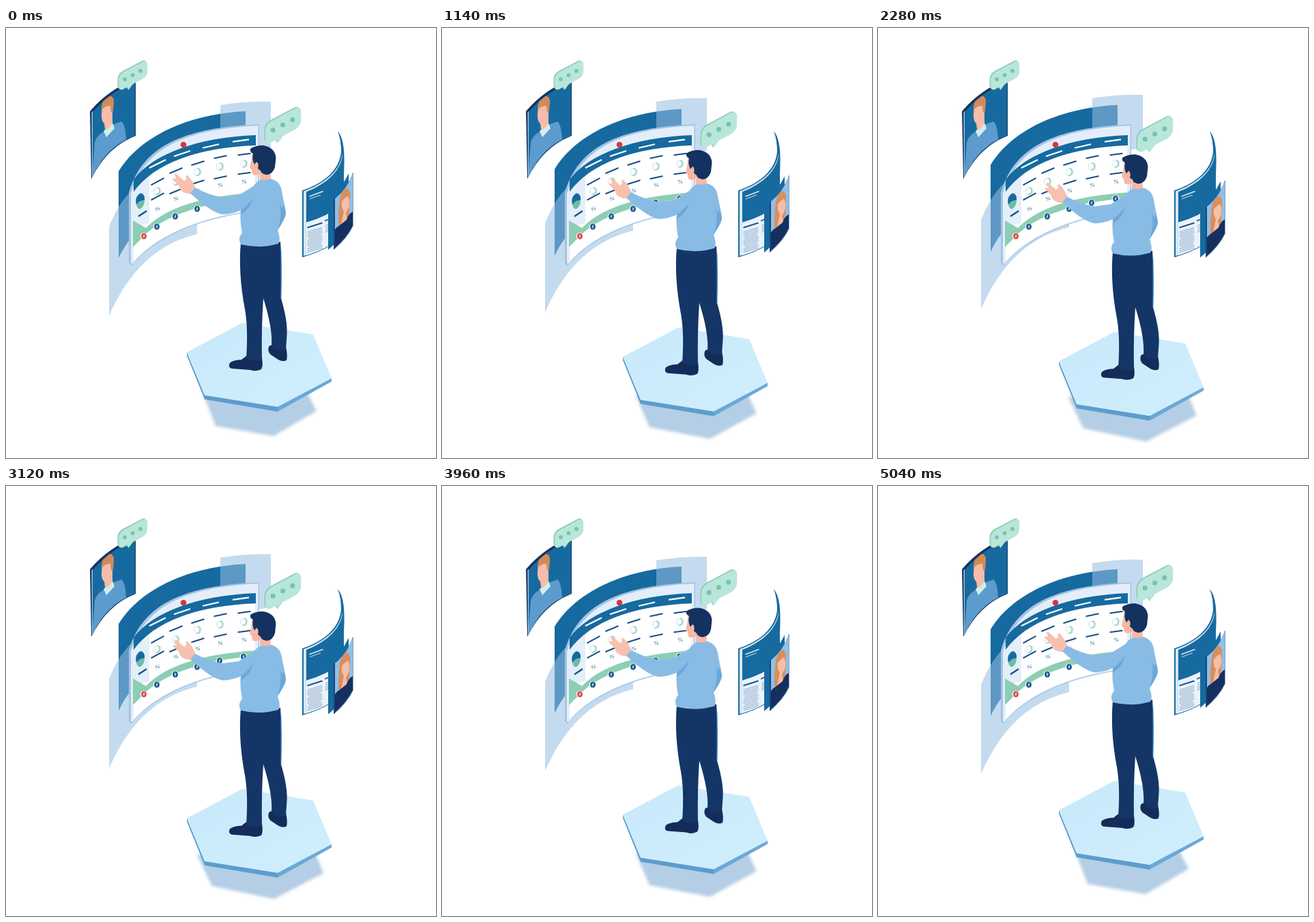
These frames come from a looping animation (630x630 px, 5.1 s). An HTML page:

```html
<!DOCTYPE html>
<html lang="en">
<head>
<meta charset="utf-8">
<title>Virtual workspace</title>
<style>
html, body { margin: 0; width: 100%; height: 100%; overflow: hidden; background: #fff; }
svg { display: block; width: 630px; height: 630px; }
text { font: bold 8px Inter, Arial, sans-serif; fill: #5d93bf; text-anchor: middle; }
</style>
</head>
<body>
<svg viewBox="0 0 630 630">
  <defs>
    <filter id="soft" x="-20%" y="-20%" width="140%" height="140%"><feGaussianBlur stdDeviation="2.3"/></filter>
    <linearGradient id="floor" x1="0" y1="0" x2="1" y2="1">
      <stop offset="0" stop-color="#c8e9fb"/><stop offset="1" stop-color="#d0effd"/>
    </linearGradient>
    <clipPath id="cardClip"><path d="M127 123Q152 94 189 78V158Q148 172 127 217Z"/></clipPath>
    <clipPath id="faceClip"><path d="M482 250Q500 236 508 213V289Q500 306 482 322Z"/></clipPath>
  </defs>

  <!-- portrait card, left -->
  <path d="M123 122Q150 90 190 75V158Q148 174 125 221Z" fill="#17335f"/>
  <path d="M125.500 123L127 122V217L126 219Z" fill="#a5c7e5"/>
  <g clip-path="url(#cardClip)">
    <path d="M120 60H195V225H120Z" fill="#176a9f"/>
    <path d="M126 220L130 168Q132 158 143 152L158 141L169 137Q175 141 176 165L160 200Z" fill="#5b9bcd"/>
    <path d="M143 151L156 139L159 147L147 160Z" fill="#d3eee9"/>
    <path d="M141 115Q147 107 156 110L156 139Q151 150 145 148L144 140Q139 136 140 125Z" fill="#f5bca9"/>
    <path d="M140 116Q142 101 152 99Q159 101 158 110L157 122L154 124L153 114Q146 113 140 120Z" fill="#d18a59"/>
  </g>
  <g id="bubbleA"></g>

  <!-- glass layers -->
  <path id="glassBack" d="M165 210C195 160 265 126 351 122V240L183 308Q173 320 165 337Z" fill="#166a9f"/>
  <g id="glassFront" fill="#97bfe2" fill-opacity=".56">
    <path d="M314 113Q350 107 388 108V185L314 200Z"/>
    <path d="M151 291Q164 258 183 239L280 200V302C218 317 178 360 151 422Z"/>
  </g>

  <!-- main panel -->
  <path d="M180 241C200 172 262 146 371 141V268C270 280 215 312 184 348L180 345Z" fill="#a4c4e4"/>
  <path d="M183 243C203 175 263 148.500 369.500 143V267C270 279 215 310 185 346L183 344Z" fill="#e3eefa"/>
  <path d="M187 241C216 198 278 174 365 171V266C278 277 217 307 187 342Z" fill="#fff"/>
  <path d="M187 241Q197 225 210 216V286L187 292Z" fill="#e3eff9"/>
  <path d="M187 222C216 184 282 160 366 157V172C280 175 216 199 187 240Z" fill="#166a9f"/>
  <path d="M186 282L205 293C229 268 275 247 366 241V249C292 255 238 273 207 300L186 321Z" fill="#8dceb4"/>
  <circle cx="260" cy="171" r="4.300" fill="#d7363c"/>
  <path d="M197 242Q204 243 203 252L196 254L191 259Q188 247 197 242Z" fill="#166a9f"/>
  <path d="M191 259L196 254L203 252Q203 261 197 265Q193 266 191 259Z" fill="#6cbca6"/>
  <path d="M194 276L206 268" stroke="#164f85" stroke-width="2.200"/>
  <g id="grid"></g>

  <!-- document, right -->
  <path d="M434 238C465 228 489 208 491 181Q491 164 486 151C497 164 496 190 495 215V300C480 320 460 328 434 336Z" fill="#176a9f"/>
  <path d="M436 239C465 229 490 210 493 184V300C480 318 460 327 436 334Z" fill="#d5e6f4"/>
  <path d="M440 240C466 230 489 212 493 188V258Q472 276 440 285Z" fill="#176a9f"/>
  <path d="M440 285Q472 276 493 258V300C480 318 460 327 440 333Z" fill="#eaf3fb"/>
  <g id="lines" fill="none"></g>

  <!-- portrait cards, right -->
  <g id="cards">
    <path d="M472 250Q490 238 502 213V292Q491 309 472 325Z" fill="#176a9f"/>
    <path d="M480 251Q500 237 508.500 211V290Q500 308 480 325Z" fill="#17477c"/>
    <g clip-path="url(#faceClip)">
      <path d="M480 205H510V326H480Z" fill="#8fc0e6"/>
      <path d="M488 260Q489 240 498 235Q505 235 504 248L502 288L488 296Q486 280 488 260Z" fill="#d98e5c"/>
      <path d="M492 254Q496 249 501 246Q505 254 502 264L498 271L500 281L491 289L495 268Q491 265 492 254Z" fill="#f6bda9"/>
      <path d="M478 328V302Q483 292 489 289L499 281Q502 271 510 268V292Z" fill="#15305f"/>
    </g>
  </g>

  <polygon id="shadow" fill="#b4cee5" filter="url(#soft)"/>

  <!-- platform, bubble and man -->
  <g id="rider">
    <path d="M265 475L291 538L398 555V562L291 544L265 480Z" fill="#5b9dce"/>
    <path d="M398 555L477 513V518L398 562Z" fill="#6aa8d8"/>
    <path d="M346 432L450 449L477 513L398 555L291 538L265 475Z" fill="url(#floor)"/>
    <g id="bubbleB"></g>

    <g fill="#152c5b">
      <path d="M385 467Q388 462 396 468L410 467Q413 480 411 487Q404 490 396 484L387 478Q383 473 385 467Z"/>
      <path d="M327 493Q328 487 345 486L354 479Q365 484 375 483Q377 496 374 500Q366 504 358 501L331 499Q326 498 327 493Z"/>
    </g>
    <path d="M344 314Q372 322 402 313Q405 350 403 396Q413 430 411.500 450L410 471Q398 475 389 466Q391 440 377 396Q374 440 375 486Q364 490 352 484Q355 440 350 412Q340 360 344 314Z" fill="#143667"/>
    <path d="M403 325V397" stroke="#4aa3da" stroke-width="1"/>
    <path d="M271 243Q262 243 256 238L253 231L245 223Q244 219 250 222L247 215Q247 212 251 215L261 224L264 221Q262 213 267 217Q273 223 278 235Z" fill="#f8c0ae"/>
    <path d="M361 180L359 196L357 205L360 208L361 214Q363 217 372 214V223Q380 228 388 222L387 200L374 182Z" fill="#f7b8a4"/>
    <path d="M358 177Q365 172 377 172Q394 175 395.500 190L394 204Q391 214 382 215Q374 214 373 209L369 206Q371 198 367 196L364 200Q360 193 362 184Q357 182 358 177Z" fill="#143260"/>
    <path d="M362 232Q368 224 374 222Q382 224 389 221Q402 225 404 239L410 269Q410 277 398 296Q403 311 399 316Q372 324 344 317Q339 308 346 300Q342 282 344 267Q330 273 317 273Q300 270 270 242L277 234Q300 246 318 248L341 245Z" fill="#89bce5"/>
    <path d="M344 267Q355 259 362 249Q358 265 344 273Z" fill="#6ca7d8"/>
    <path d="M401 256Q405 275 398 296Q410 278 410 272L407 258Q405 270 401 256Z" fill="#6ca7d8"/>
  </g>
</svg>

<script>
const $ = id => document.getElementById(id);

function bubble(id, x, y, w, h, s) {
  const box = (dx, dy, fill) => `<g transform="translate(${x + dx} ${y + dy})" fill="${fill}">
    <path d="M${-w * .2} ${h * .62}L${-w * .16} ${h * .86}L${w * .04} ${h * .4}L${-w * .3} ${h * .5}Z"/>
    <rect x="${-w / 2}" y="${-h / 2}" width="${w}" height="${h}" rx="${h * .28}" transform="skewY(-28)"/></g>`;
  const dots = [-1, 0, 1].map(i =>
    `<circle cx="${x + i * s}" cy="${y - i * s * .53}" r="${h * .115}" fill="#78c3ad"/>`);
  $(id).innerHTML = box(-1, -.6, '#8fcdbb') + box(.7, .5, '#b8e6da') + dots.join('');
}
bubble('bubbleA', 185.5, 69, 42, 25, 11.5);
bubble('bubbleB', 405.5, 142, 52, 31, 14.3);

function dash(x, y, half, slope, color, width = 2) {
  return `<path d="M${x - half} ${y - half * slope}L${x + half} ${y + half * slope}" stroke="${color}" stroke-width="${width}"/>`;
}

// columns: x, slope, upper dash, ring, lower dash, percent, badge
const columns = [
  [222, -.55, 225, 239, 247, 265, 291],
  [249, -.42, 209, 225, 239, 250, 276],
  [281, -.32, 198, 211, 226, 238, 265],
  [314, -.22, 189, 203, 219, 230, 256],
  [349, -.13, 185, 199, 213, 225, 250]
];
const badge = (x, y, color) => `<circle cx="${x}" cy="${y}" r="5.300" fill="#fff"/>
  <ellipse cx="${x}" cy="${y}" rx="4" ry="4.600" fill="${color}"/>
  <path d="M${x} ${y - 2.5}V${y + 2.5}M${x - 1.5} ${y + 1}L${x + 1.5} ${y - 1}" stroke="#fff" stroke-width=".9"/>`;

$('grid').innerHTML =
  [[222, 199, -.5], [258, 184, -.34], [300, 173, -.23], [344, 165, -.14]]
    .map(([x, y, k]) => dash(x, y, 12, k, '#fff', 2.2)).join('') +
  columns.map(([x, k, top, ring, low, pct, dot]) =>
    dash(x, top, 9.5, k, '#164f85') + dash(x, low, 9.5, k, '#164f85') +
    `<circle cx="${x}" cy="${ring}" r="5.300" fill="none" stroke="#d9e9f2" stroke-width="1.400"/>
     <path d="M${x} ${ring - 5.3}A5.300 5.300 0 0 1 ${x - 2} ${ring + 4.9}" fill="none" stroke="#8acbb6" stroke-width="1.500"/>
     <text transform="translate(${x} ${pct + 3}) skewY(${k * 50})">%</text>` +
    badge(x - 1, dot, '#17598f')).join('') +
  badge(202, 305, '#d74a48');

let lines = dash(454.5, 243, 10, -.38, '#d9eaf7', 1.5) + dash(453, 247.5, 8, -.38, '#b8d5eb', 1.2) +
  dash(452.5, 289, 11, -.32, '#17598f', 2) + dash(471, 281, 4, -.45, '#17598f', 1.5);
for (let i = 0; i < 13; i++) {
  lines += dash(452.5, 295.5 + i * 2.5, i % 5 === 4 ? 9 : 11, -.3, '#91adc9', 1.1);
  if (i < 5) lines += dash(471, 288 + i * 2.5, 3, -.45, '#91adc9', 1);
}
$('lines').innerHTML = lines;

const LOOP = 5100, STEP = 60;
const rest = [[289, 536], [307, 583], [392, 598], [455, 561], [440, 532]];
const low = [[277, 541], [300, 587], [393, 607], [468, 569], [457, 540]];

// straight rise to a peak, straight return
function swing(t, start, peak, end) {
  return Math.max(0, Math.min((t - start) / (peak - start), (end - t) / (end - peak)));
}
const shift = (id, y) => $(id).setAttribute('transform', `translate(0 ${y.toFixed(2)})`);

function draw() {
  const t = Math.floor(performance.now() % LOOP / STEP) * STEP;
  const ride = swing(t, 0, 2580, 5040);
  const late = swing(t, 540, 2500, 4860);
  shift('rider', 15 * ride);
  shift('glassFront', -11 * swing(t, 0, 2500, 4860));
  shift('glassBack', -10.5 * late);
  shift('cards', 13 * late);
  $('shadow').setAttribute('points', rest.map((p, i) =>
    p.map((v, j) => (v + (low[i][j] - v) * ride).toFixed(2)).join()).join(' '));
  requestAnimationFrame(draw);
}
draw();
</script>
</body>
</html>
```
